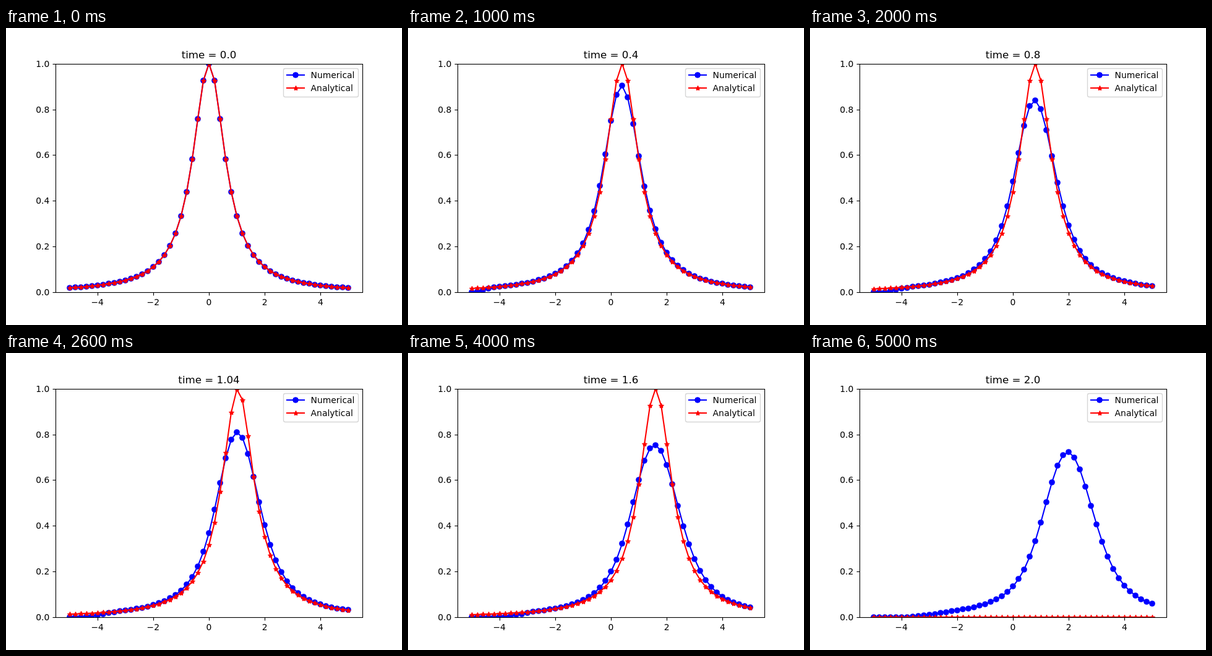
These frames come from a looping animation (640 by 480 pixels, 5100 ms). An HTML page with a canvas:

```html
<!DOCTYPE html>
<html lang="en">
<head>
<meta charset="utf-8">
<title>Advection: numerical and analytical</title>
<style>
  html, body { margin: 0; width: 100%; height: 100%; overflow: hidden; background: #fff; }
  canvas { display: block; }
</style>
</head>
<body>
<canvas id="plot" width="640" height="480"></canvas>
<script>
const ctx = document.getElementById('plot').getContext('2d');
const PT = 100 / 72;                 // pixels per point
const POINTS = 51, STEPS = 50, DT = 0.04, DX = 0.2, FRAME_MS = 100;
const BLUE = '#00f', RED = '#f00';
const LEFT = 80, RIGHT = 576, TOP = 57.6, BOTTOM = 427.2;

const toX = x => 328 + x * (RIGHT - LEFT) / 11;
const toY = y => BOTTOM - y * (BOTTOM - TOP);
const nearest = v => Math.floor(v + 0.5);
const snap = v => nearest(v) + 0.5;

const xs = Array.from({ length: POINTS }, (_, i) => -5 + i * DX);
const profile = x => 1 / (1 + 2 * x * x);

// First-order upwind scheme with a zero inflow value
const numerical = [xs.map(profile)];
for (let n = 0; n < STEPS; n++) {
  const u = numerical[n];
  numerical.push(u.map((v, i) => i ? v - DT / DX * (v - u[i - 1]) : 0));
}

// The exact solution is left at zero on the last step
const analytical = n => xs.map(x => n < STEPS ? profile(x - n * DT) : 0);

const star = new Path2D();
for (let k = 0; k < 10; k++) {
  const r = 3 * PT * (k % 2 ? 0.381966 : 1), a = Math.PI * (0.5 + k / 5);
  star.lineTo(snap(r * Math.cos(a)), snap(-r * Math.sin(a)));
}
star.closePath();

const disc = new Path2D();
disc.arc(0, 0, 3.5 * PT, 0, 2 * Math.PI);

function drawMarker(shape, x, y, color) {
  ctx.save();
  ctx.translate(nearest(x), nearest(y));
  ctx.fillStyle = ctx.strokeStyle = color;
  ctx.fill(shape);
  if (shape === star) {
    ctx.lineWidth = PT;
    ctx.lineJoin = 'bevel';
    ctx.stroke(shape);
  }
  ctx.restore();
}

function drawLine(points, color, width, cap = 'square') {
  ctx.strokeStyle = color;
  ctx.lineWidth = width * PT;
  ctx.lineCap = cap;
  ctx.lineJoin = 'round';
  ctx.beginPath();
  points.forEach(p => ctx.lineTo(...p));
  ctx.stroke();
}

function clipped(bottom, draw) {
  ctx.save();
  ctx.beginPath();
  ctx.rect(LEFT, 58, RIGHT - LEFT, bottom - 58);
  ctx.clip();
  draw();
  ctx.restore();
}

function drawSeries(values, shape, color) {
  const flat = values.every(v => v === 0);
  const points = values.map((v, i) => [toX(xs[i]), flat ? nearest(BOTTOM) : toY(v)]);
  clipped(427, () => drawLine(points, color, 1.5));
  clipped(428, () => points.forEach(([x, y]) => drawMarker(shape, x, y, color)));
}

function drawText(text, x, y, align, points = 10) {
  ctx.font = `${points * PT}px "DejaVu Sans", sans-serif`;
  ctx.textAlign = align;
  ctx.fillStyle = '#000';
  ctx.fillText(text, x, y);
}

function drawAxes() {
  for (const v of [-4, -2, 0, 2, 4]) {
    const x = snap(toX(v));
    drawLine([[x, 427.5], [x, 432.5]], '#000', 0.8, 'butt');
    drawText(String(v).replace('-', '\u2212'), toX(v), 448, 'center');
  }
  for (let k = 0; k <= 5; k++) {
    const y = snap(toY(k / 5));
    drawLine([[75.5, y], [80.5, y]], '#000', 0.8, 'butt');
    drawText((k / 5).toFixed(1), 70.3, nearest(toY(k / 5) + 5), 'right');
  }
  ctx.lineWidth = 0.8 * PT;
  ctx.lineJoin = 'miter';
  ctx.strokeRect(80.5, 58.5, 496, 369);
}

function drawLegend() {
  ctx.strokeStyle = '#d6d6d6';
  ctx.lineWidth = PT;
  ctx.beginPath();
  ctx.roundRect(448.5, 65.5, 121, 46, 2.8);
  ctx.stroke();
  [['Numerical', disc, BLUE], ['Analytical', star, RED]].forEach(([name, shape, color], i) => {
    const y = 76 + 21 * i;
    drawLine([[454, y], [482, y]], color, 1.5);
    drawMarker(shape, 468, y, color);
    drawText(name, 492.6, y + 5, 'left');
  });
}

function render(now) {
  const n = Math.floor(now / FRAME_MS) % (STEPS + 1);
  const time = n * DT;
  ctx.fillStyle = '#fff';
  ctx.fillRect(0, 0, 640, 480);
  drawSeries(numerical[n], disc, BLUE);
  drawSeries(analytical(n), star, RED);
  drawAxes();
  drawLegend();
  drawText('time = ' + (Number.isInteger(time) ? time.toFixed(1) : time), 328, 49, 'center', 12);
  requestAnimationFrame(render);
}
requestAnimationFrame(render);
</script>
</body>
</html>
```
